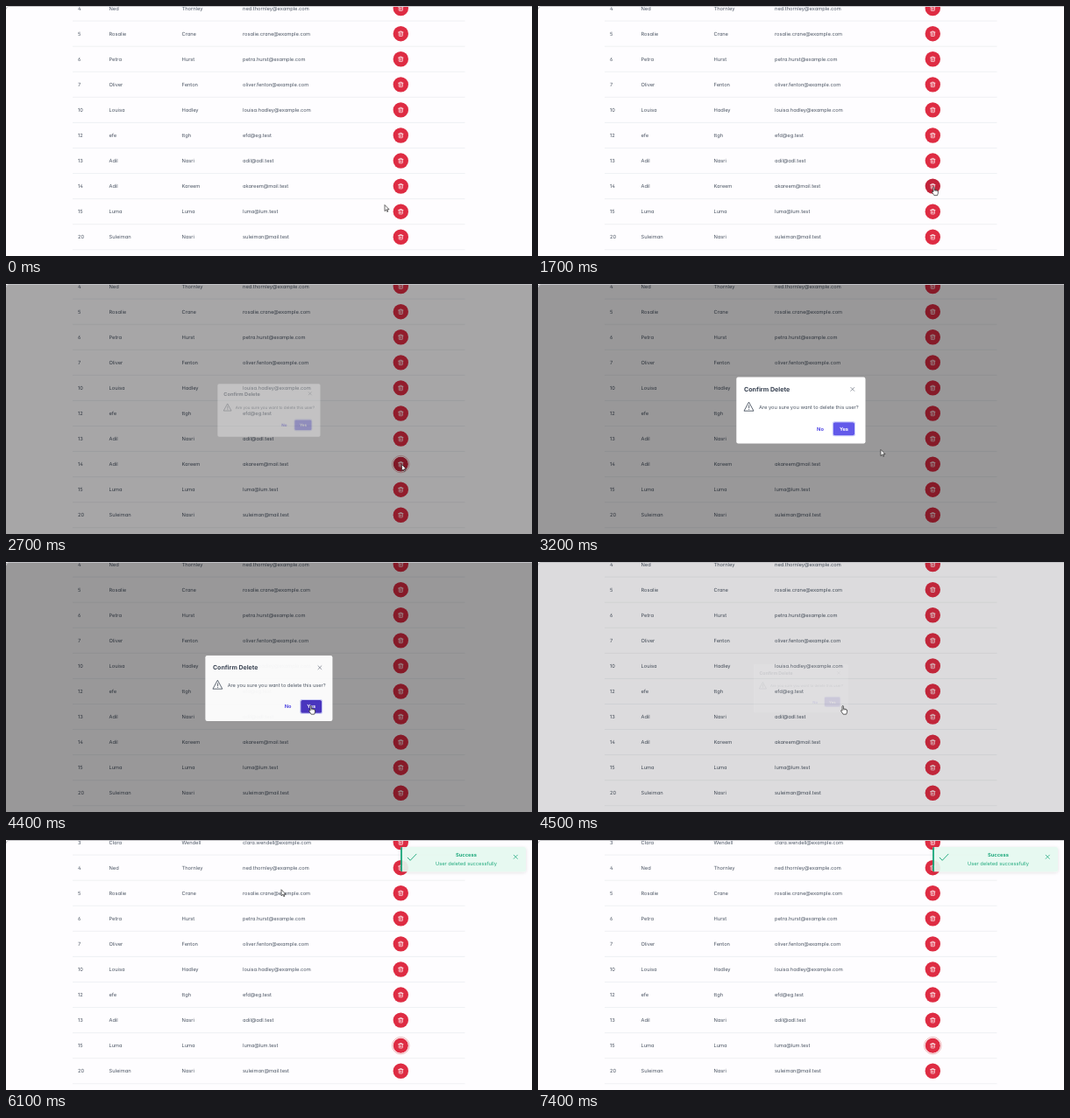
Animation, 600 px wide and 286 px high, one loop 7500 ms. Source, as an HTML page:

```html
<!DOCTYPE html>
<html lang="en">
<head>
<meta charset="utf-8">
<title>Delete user</title>
<style>
html, body { margin: 0; width: 100%; height: 100%; overflow: hidden; background: #fefdff; }
svg { display: block; width: 600px; height: 286px; }
text {
  font: 5.73px Inter, sans-serif;
  font-feature-settings: "cv02", "cv03", "cv04", "cv11";
  text-rendering: geometricPrecision;
  fill: #4b5563;
}
.bold { font-weight: 700; }
.mid { text-anchor: middle; }
.green { fill: #1ea97c; }
.line { fill: none; stroke-linecap: round; stroke-linejoin: round; }
</style>
</head>
<body>
<svg viewBox="0 0 600 286">
  <defs>
    <filter id="soft" x="-10%" y="-30%" width="120%" height="180%">
      <feDropShadow dx="0" dy="1" stdDeviation="2" flood-color="#000" flood-opacity=".13"/>
    </filter>
    <g id="trash">
      <circle r="8.7"/>
      <path class="line" stroke="#fff" stroke-width=".65" d="M-2.7-1.7H2.7M-1.2-1.8V-2.7H1.2V-1.8M-2.1-1.6V2.1Q-2.1 2.8-1.4 2.8H1.4Q2.1 2.8 2.1 2.1V-1.6M-.75-.2V1.5M.75-.2V1.5"/>
    </g>
  </defs>

  <g id="rows"></g>

  <g id="ring" fill="none">
    <circle r="9.05" stroke="#fff" stroke-width=".8"/>
    <circle r="9.75" stroke="#e9a3a6" stroke-width=".8"/>
  </g>

  <rect id="mask" y="1" width="600" height="285"/>

  <g id="dialog">
    <rect x="226.3" y="106.5" width="147.2" height="76" rx="2.2" fill="#fff"/>
    <text class="bold" x="235" y="123.2" style="font-size:7.1px;fill:#374151">Confirm Delete</text>
    <path class="line" stroke="#6b7280" stroke-width=".7" d="M356.8 118.4l4 4m0-4l-4 4"/>
    <path class="line" stroke="#4b5563" stroke-width=".9" d="M240.7 135.4L246 145.2H235.4ZM240.7 138.8V141.8M240.7 143.4V143.5"/>
    <text x="252" y="142.7">Are you sure you want to delete this user?</text>
    <text class="bold mid" x="322" y="167.8" style="fill:#4f46e5">No</text>
    <rect x="335.8" y="157.2" width="26.2" height="17" rx="2.6" fill="#c3c5fb"/>
    <rect x="336.6" y="158" width="24.6" height="15.4" rx="2" fill="#fff"/>
    <rect id="yes" x="336.8" y="158.2" width="24.2" height="15" rx="1.9"/>
    <text class="bold mid" x="349" y="167.8" style="fill:#fff">Yes</text>
  </g>

  <g id="toast">
    <g opacity=".92" filter="url(#soft)">
      <rect x="450" y="8" width="143" height="28.2" rx="2" fill="#e6f9f0"/>
      <path class="green" d="M452 8H451.8Q450 8 450 10V34.2Q450 36.2 451.8 36.2H452Z"/>
    </g>
    <path class="line" stroke="#1ea97c" stroke-width=".95" d="M458.2 20.2L461.2 23.3 468 16.2"/>
    <text class="bold mid green" x="525" y="19.2">Success</text>
    <text class="mid green" x="525" y="28.7">User deleted successfully</text>
    <path class="line" stroke="#1ea97c" stroke-width=".75" d="M579.2 17.2l4.2 4.2m0-4.2l-4.2 4.2"/>
  </g>

  <path class="line" stroke="#c4c4c8" d="M.2 3.4Q.3.5 3 .5H600"/>

  <g id="cursor" fill="#fff" stroke="#222" stroke-width="1.6" stroke-linejoin="round">
    <path id="arrow" transform="scale(.42)" d="M0 0V17L4 13.2 6.6 19 9 18 6.5 12.3H12Z"/>
    <g id="hand" transform="translate(0 .5) scale(.44)">
      <path d="M-1.5 13V1.5A1.5 1.5 0 0 1 1.5 1.5V7.6L9 9.2Q11 9.8 11 12.5V16.5L9 22H1L-4.5 14Q-5.5 11.6-3.4 11.4Z"/>
      <path fill="none" stroke-width="1" d="M1.5 7.6V11.5M4.8 8.4V11.7M8 9V12"/>
    </g>
  </g>
</svg>
<script>
const LOOP = 7500, STEP = 100, PITCH = 29.07, FIRST = 31.7, BTN_X = 450.3;
const PRESS = 2500, CLOSE = 4400, REMOVE = 4800;
const DELETED = 8;
const RED = '#de2c43', RED_HOVER = '#c1233a';
const columns = [82, 117.5, 200.5, 270];
// Rows without an address get first.last@example.com
const users = [
  [3, 'Clara', 'Wendell'],
  [4, 'Ned', 'Thornley'],
  [5, 'Rosalie', 'Crane'],
  [6, 'Petra', 'Hurst'],
  [7, 'Oliver', 'Fenton'],
  [10, 'Louisa', 'Hadley'],
  [12, 'efe', 'ttgh', 'efd@eg.test'],
  [13, 'Adil', 'Nasri', 'adil@adl.test'],
  [14, 'Adil', 'Kareem', 'akareem@mail.test'],
  [15, 'Luma', 'Luma', 'luma@lum.test'],
  [20, 'Suleiman', 'Nasri', 'suleiman@mail.test']
];

// Pointer stops and the glides between them
const rest = [432, 227.5], onTrash = [451.5, 206.5], onYes = [347.7, 164], away = [290, -20];
const glides = [
  { from: rest, to: onTrash, start: 0, length: 1200, bend: 0 },
  { from: onTrash, to: onYes, start: 2700, length: 900, bend: 8 },
  { from: onYes, to: away, start: 5100, length: 1800, bend: 0 }
];

const $ = id => document.getElementById(id);
const rowY = slot => FIRST + PITCH * (slot - 2);
const within = (t, a, b) => t >= a && t < b;
const ramp = (t, start, length) => Math.min(1, Math.max(0, (t - start) / length));
const smooth = p => p * p * (3 - 2 * p);
const easeOut = (p, power) => 1 - (1 - p) ** power;

function set(el, attrs) {
  for (const k in attrs) el.setAttribute(k, attrs[k]);
}

function add(parent, tag, attrs, content = '') {
  const el = document.createElementNS('http://www.w3.org/2000/svg', tag);
  set(el, attrs);
  el.textContent = content;
  return parent.appendChild(el);
}

function show(el, on) { el.style.display = on ? '' : 'none'; }

function pointer(t) {
  const glide = glides.findLast(g => t >= g.start);
  const p = smooth(ramp(t, glide.start, glide.length));
  const [x, y] = glide.from.map((v, i) => v + (glide.to[i] - v) * p);
  return [x, y + glide.bend * Math.sin(Math.PI * p)];
}

const rows = users.map(([id, first, last, mail], slot) => {
  const g = add($('rows'), 'g', {});
  mail ||= `${first}.${last}@example.com`.toLowerCase();
  [id, first, last, mail].forEach((value, c) => add(g, 'text', { x: columns[c], y: 2.05 }, value));
  add(g, 'path', { d: 'M76 14.5H523.5', stroke: '#e5e7eb', 'stroke-width': .6 });
  const button = add(g, 'use', { href: '#trash', x: BTN_X });
  return { g, button, slot };
});

function draw(t) {
  const gone = t >= REMOVE;
  for (const { g, button, slot } of rows) {
    set(g, { transform: `translate(0 ${rowY(slot + (gone && slot < DELETED))})` });
    show(g, !(gone && slot === DELETED));
    set(button, { fill: slot === DELETED && within(t, 900, 2800) ? RED_HOVER : RED });
  }

  show($('ring'), within(t, PRESS, 2800) || t > CLOSE + 150);
  set($('ring'), { transform: `translate(${BTN_X} ${rowY(DELETED + gone)})` });
  set($('mask'), { opacity: .4 * (ramp(t, 2570, 150) - ramp(t, CLOSE, 150)) });

  const open = easeOut(ramp(t, 2682, 150), 3) - smooth(ramp(t, CLOSE - 20, 150));
  set($('dialog'), {
    opacity: open,
    transform: `translate(300 144.5) scale(${.7 + .3 * open}) translate(-300 -144.5)`
  });
  set($('yes'), { fill: within(t, 3500, 4600) ? '#4631c0' : '#6259ea' });

  const shown = easeOut(ramp(t, REMOVE + 30, 300), 2);
  set($('toast'), { opacity: shown, transform: `translate(0 ${14 * (1 - shown)})` });

  const pointing = within(t, 900, 2600) || within(t, 3500, 4600);
  set($('cursor'), { transform: `translate(${pointer(t)})` });
  show($('hand'), pointing);
  show($('arrow'), !pointing);
}

const start = performance.now();
function tick() {
  const t = (performance.now() - start) % LOOP;
  draw(Math.floor(t / STEP) * STEP);
  requestAnimationFrame(tick);
}
tick();
</script>
</body>
</html>
```
